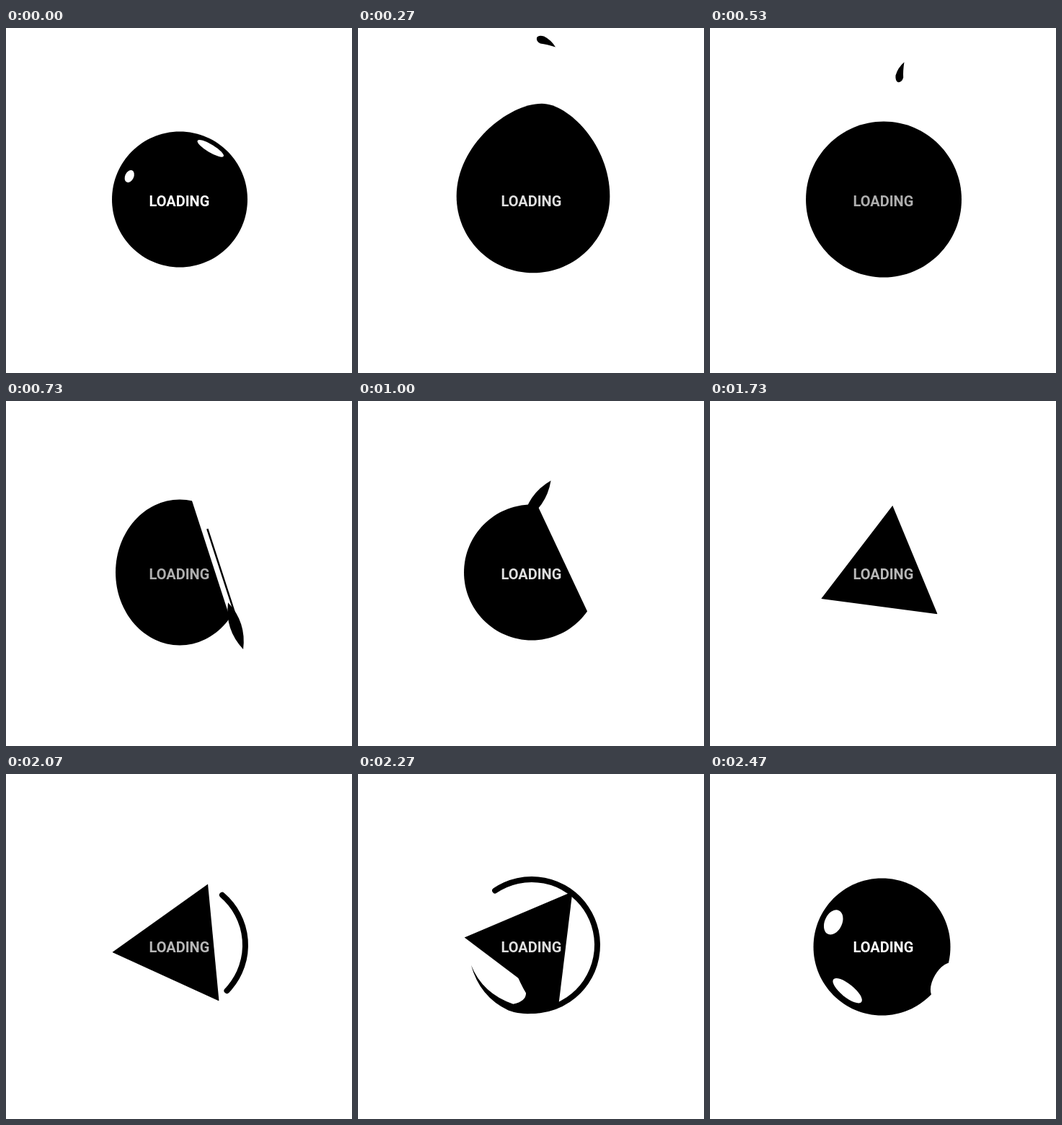
An HTML page with a canvas that plays this animation: 480 px wide and 478 px high, repeating every 2.54 s.

```html
<!DOCTYPE html>
<html lang="en">
<head>
<meta charset="utf-8">
<title>Loading</title>
<style>
  html, body { margin: 0; width: 100%; height: 100%; overflow: hidden; background: #fff; }
  canvas { display: block; }
</style>
</head>
<body>
<canvas id="stage" width="480" height="478"></canvas>
<script>
const ctx = document.getElementById('stage').getContext('2d');
const LOOP = 2540, STEPS = 38, RING_START = 29, FILLED = 35;
const CX = 241, CY = 238, RADIUS = 94, EDGE = 47, RAD = Math.PI / 180;

// Each slash cuts off one side of the circle, leaving a triangle.
const SLASHES = [
  { at: 11, side: -30, dir: 1, length: 68, width: 8 },
  { at: 17, side: 210, dir: -1, length: 68, width: 8 },
  { at: 20, side: 90, dir: -1, length: 100, width: 12 }
];
// Gaps that close while the circle fills up again.
const POCKETS = [
  { angle: 205, dist: 77, length: 18, width: 12, from: 35, to: 38 },
  { angle: 129, dist: 80, length: 25, width: 9, from: 35, to: 37 },
  { angle: 30, dist: 97, length: 28, width: 15, from: 35, to: 37 },
  { angle: 301, dist: 83, length: 42, width: 11, from: 38, to: 38 }
];

const bump = (k, centre, width) => Math.exp(-(((k - centre) / width) ** 2));
const turnAt = k => k < 20 ? 12 - 1.8 * (k - 11) : -4 + 41 * ((k - 20) / 14) ** 1.5;

// Draws in a frame whose x axis points outwards at the given angle.
function turned(x, y, angle, paint) {
  ctx.save();
  ctx.translate(x, y);
  ctx.rotate(angle * RAD);
  paint();
  ctx.restore();
}

function fill(path, color = '#000') {
  ctx.fillStyle = color;
  ctx.fill(new Path2D(path));
}

function body(k) {
  const egg = bump(k, 4, 1.6), recoil = bump(k, 37, .6), c = .552;
  const r = RADIUS + 15 * Math.sin(Math.PI * Math.min(1, k / 13)) + recoil;
  const x = CX + 2 * egg - 2.5 * recoil, y = CY - .5 - 4.5 * egg + 2 * recoil;
  const rx = r - 12 * bump(k, 11, 1.3), round = c - .16 * egg;
  const topX = x + 12 * egg, topY = y - r - 22 * egg;
  const left = x - rx, right = x + rx, high = y + (topY - y) * c;
  ctx.fillStyle = '#000';
  ctx.beginPath();
  ctx.moveTo(topX, topY);
  ctx.bezierCurveTo(topX + (right - topX) * round, topY, right, high, right, y);
  ctx.bezierCurveTo(right, y + r * c, x + rx * c, y + r, x, y + r);
  ctx.bezierCurveTo(x - rx * c, y + r, left, y + r * c, left, y);
  ctx.bezierCurveTo(left, high, topX - (topX - left) * round, topY, topX, topY);
  ctx.fill();
}

// The drop is thrown up, turns over and falls back.
function drop(k) {
  turned(256 + k, 13 + 5.5 * (k - 5) ** 2, -25 * (k - 4), () =>
    fill('M-12 -5Q-10 -9-2 -7Q8 -2 14 8Q2 4-7 3Q-13 0-12 -5Z'));
}

function cut({ side }, turn) {
  turned(CX, CY, turn + side, () => {
    ctx.fillStyle = '#fff';
    ctx.fillRect(EDGE, -150, 120, 300);
  });
}

function blade({ at, side, dir, length, width }, k, turn) {
  const age = k - at;
  if (age < -2 || age > 3) return;
  const size = 1 - Math.max(0, age) / 4;
  const tip = 128 + age * (age < 0 ? 90 : 8), end = tip - length * size;
  const mid = (tip + end) / 2, x = EDGE + width / 2, w = 2 * width * size;
  turned(CX, CY, turn + side, () => {
    ctx.scale(1, dir);
    fill(`M${x} ${end}Q${x + w} ${mid} ${x} ${tip}Q${x - w} ${mid} ${x} ${end}Z`);
    if (age >= 0) {
      ctx.fillRect(EDGE + 7, mid - 140 * size, 2.5, 140 * size);
    }
  });
}

function ring(k) {
  const p = (k - RING_START) / 5;
  ctx.lineWidth = 8;
  ctx.lineCap = 'round';
  ctx.beginPath();
  ctx.arc(CX, CY - 1, 91, -124 * p * RAD, 110 * p * RAD);
  ctx.stroke();
}

// Ink that joins the ring to the triangle, with a thin tail.
function pool(turn) {
  turned(CX, CY, turn + 90, () =>
    fill('M40 0Q52 -20 57 -33Q66 -40 80 -28Q94 15 72 51Q100 15 91 -28Q82 -58 47 -80L40 -80Z'));
}

function pocket({ angle, dist, length, width, from, to }, k) {
  if (k < from || k > to) return;
  const size = (39 - k) / 2;
  turned(CX, CY, angle, () => {
    ctx.fillStyle = '#fff';
    ctx.beginPath();
    ctx.ellipse(dist, 0, width * size, length * size, 0, 0, 2 * Math.PI);
    ctx.fill();
  });
}

function label(k) {
  const v = Math.round(212 + 43 * Math.cos(4 * Math.PI * k / STEPS));
  ctx.font = '700 20px Roboto, sans-serif';
  ctx.fillStyle = `rgb(${v},${v},${v})`;
  ctx.fillText('LOADING', 198.5, 247.3);
}

function draw(k) {
  const turn = turnAt(k);
  ctx.fillStyle = '#fff';
  ctx.fillRect(0, 0, 480, 478);
  body(k);
  if (k < FILLED) {
    SLASHES.filter(s => k >= s.at).forEach(s => cut(s, turn));
    SLASHES.forEach(s => blade(s, k, turn));
    if (k > 2 && k < 11) drop(k);
    if (k > RING_START) ring(k);
    if (k > 32) pool(turn);
  }
  POCKETS.forEach(p => pocket(p, k || STEPS));
  label(k);
}

const start = performance.now();

function tick(now) {
  const t = Math.max(0, now - start) % LOOP;
  draw(Math.min(STEPS - 1, Math.floor((t + 7) * STEPS / LOOP)));
  requestAnimationFrame(tick);
}

tick(start);
</script>
</body>
</html>
```
